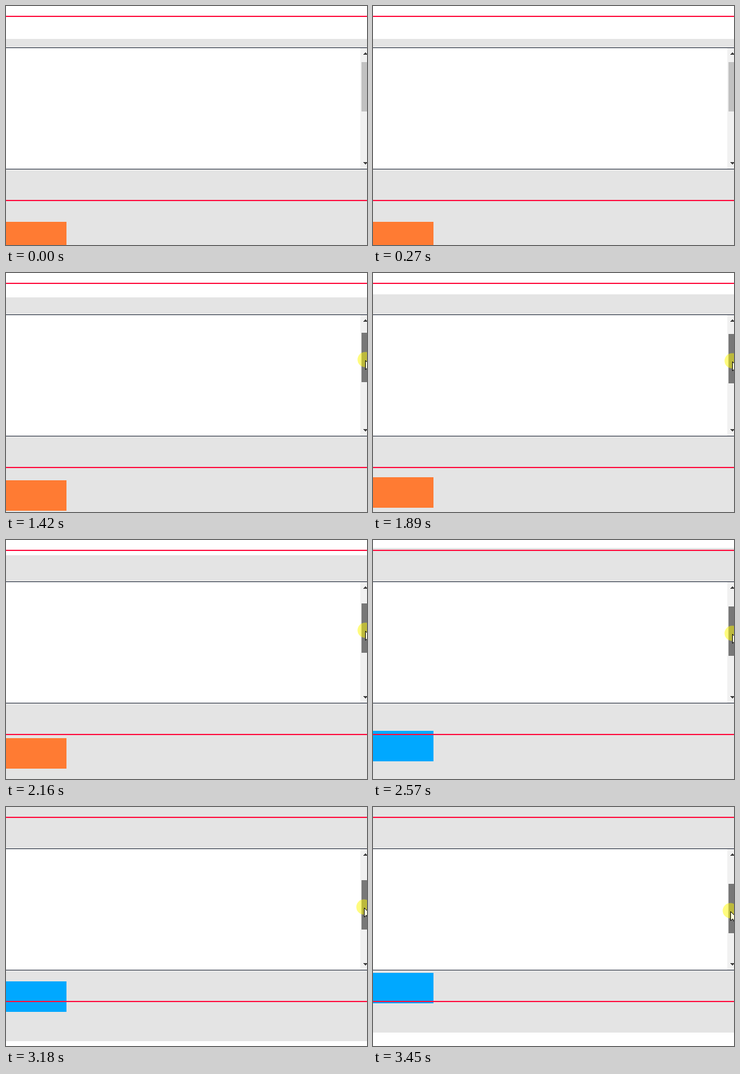
Write an HTML page with a canvas that moves like this. It is 591 px wide and 392 px high and loops after 3.65 s.

```html
<!DOCTYPE html>
<html>
<head>
<meta charset="utf-8">
<style>
  html, body { margin: 0; width: 591px; height: 392px; overflow: hidden; }
  canvas { display: block; }
</style>
</head>
<body>
<canvas id="stage" width="591" height="392"></canvas>
<script>
const ctx = document.getElementById('stage').getContext('2d');
const LOOP = 3650, HOVER = 950, PRESS = 1020, STEP = 68;

// Each pull moves the thumb at an even pace to a new offset
const pulls = [
  { start: 1020, end: 1420, to: 6 },
  { start: 1820, end: 2290, to: 13 },
  { start: 2350, end: 2570, to: 17 },
  { start: 2770, end: 2900, to: 20 },
  { start: 2970, end: 3250, to: 30 },
  { start: 3310, end: 3450, to: 34 }
];

function dragAt(t) {
  let drag = 0;
  for (const { start, end, to } of pulls) {
    if (t < start) break;
    const gaps = Math.round((end - start) / STEP);
    const done = 1 + Math.min(gaps, Math.floor((t - start) * gaps / (end - start)));
    drag += Math.ceil((to - drag) * done / (gaps + 1));
  }
  return drag;
}

function rect(x, y, w, h, color) {
  ctx.fillStyle = color;
  ctx.fillRect(x, y, w, h);
}

// Stepped triangle with its tip at y, growing in direction dir
function arrow(y, dir) {
  for (let i = 0; i < 4; i++) rect(588 - i, y + i * dir, 1 + 2 * i, 1, '#404040');
}

function pointer(x, y) {
  ctx.save();
  ctx.translate(x + 0.5, y + 0.5);
  const outline = new Path2D('M0 0V15L3.5 12L6 17L8 16L6 11H11Z');
  ctx.fillStyle = '#ffd';
  ctx.fill(outline);
  ctx.strokeStyle = '#000';
  ctx.stroke(outline);
  ctx.restore();
}

function halo(x, y) {
  ctx.beginPath();
  ctx.arc(x, y, 12.5, 0, Math.PI * 2);
  ctx.fillStyle = 'rgba(255, 250, 0, 0.5)';
  ctx.fill();
}

function scrollbar(t, drag) {
  rect(580, 69, 11, 198, '#f1f1f1');
  const color = t >= PRESS ? '#787878' : t >= HOVER ? '#a8a8a8' : '#c1c1c1';
  rect(582, 92 + drag, 9, 81, color);
  arrow(76, 1);
  arrow(259, -1);
}

function draw(t) {
  const drag = dragAt(t);
  const scroll = Math.floor(drag * 2.435);
  const boxTop = 354 - scroll;

  rect(0, 0, 591, 392, '#fff');
  rect(0, 54 - scroll, 591, 398, '#e4e4e4');
  rect(0, boxTop, 99, 50, boxTop < 319 ? '#00a8ff' : '#ff7b33');

  rect(0, 68, 591, 200, '#1c2536');
  rect(0, 69, 591, 198, '#fff');
  scrollbar(t, drag);

  rect(0, 16, 591, 2, '#ff1040');
  rect(0, 318, 591, 2, '#ff1040');

  if (t >= HOVER) {
    const x = Math.round(588.6 - drag * drag / 340);
    const y = 136 + drag;
    if (t >= PRESS) halo(x, y);
    pointer(x, y + 1);
  } else if (t >= 200 && t < 270) {
    pointer(587, 302);
  }
}

const begin = performance.now();
function tick() {
  draw((performance.now() - begin) % LOOP);
  requestAnimationFrame(tick);
}
tick();
</script>
</body>
</html>
```
